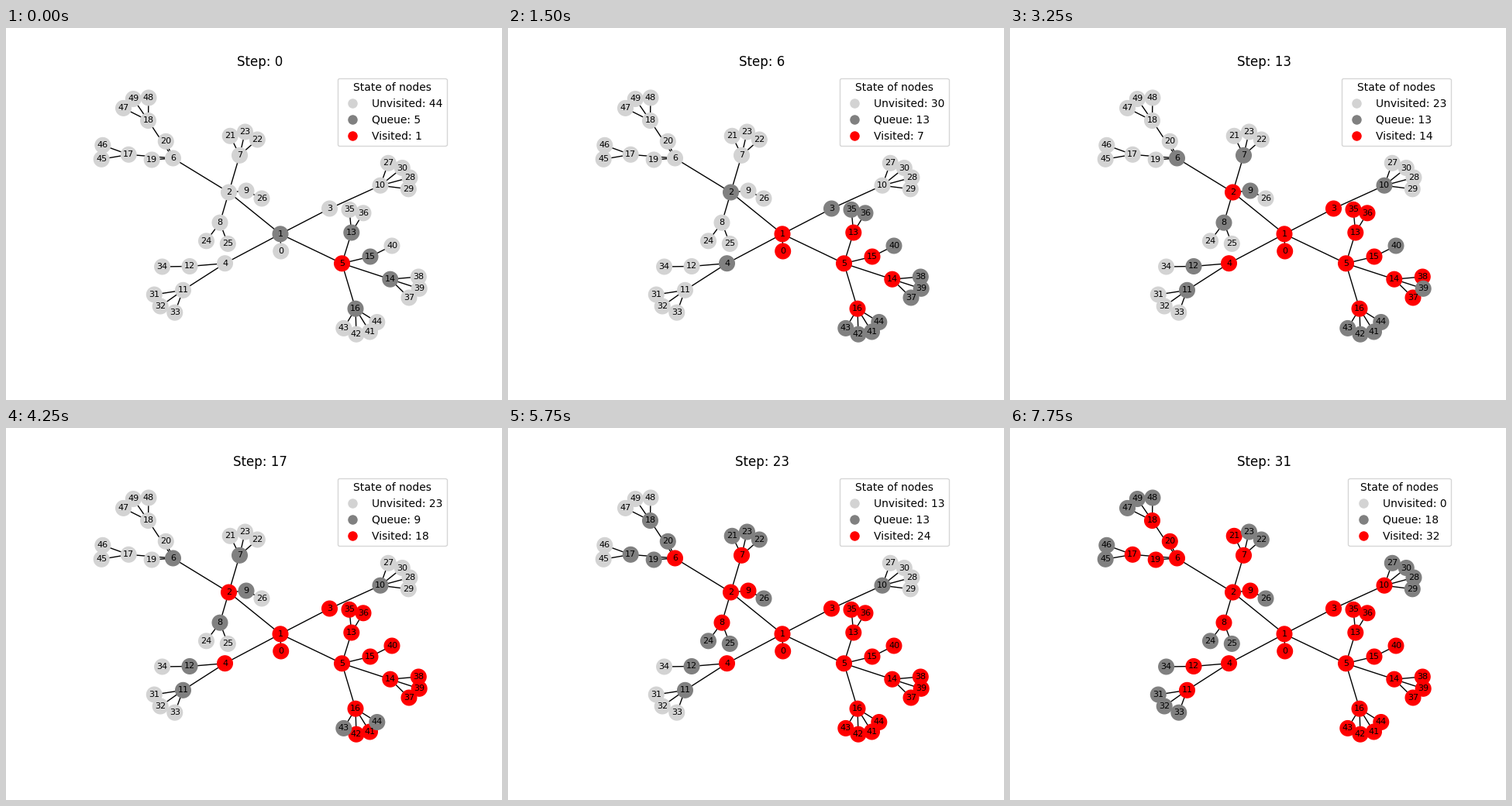
A matplotlib script that plays this animation: 640 by 480 pixels, repeating every 8 s.

```python
import matplotlib.pyplot as plt
from matplotlib.animation import FuncAnimation
from matplotlib.collections import LineCollection
from matplotlib.lines import Line2D

STEPS = 32
START = 5
COLORS = {"Unvisited": "lightgray", "Queue": "gray", "Visited": "red"}

# Node centres in stage pixels, y pointing down
POS = [
    (354.7, 288), (354, 265.8), (287.5, 212), (417.5, 233), (282.5, 303.7),
    (433.5, 303.8), (215.5, 168), (301.5, 164.3), (276, 251.2), (310, 210),
    (483, 203.2), (228.5, 338.3), (237, 307.5), (445.8, 264), (495.8, 324.2),
    (470, 295), (451, 362.2), (158.2, 163.3), (183.5, 119.5), (188.2, 170),
    (206.3, 146.3), (289.2, 139.3), (324.3, 144), (308.5, 134), (258.5, 274.8),
    (286.3, 278.4), (330, 220), (493.3, 174.3), (521, 193), (519.3, 207.8),
    (511.3, 180.5), (191.3, 344), (199.2, 359), (217.8, 367.2), (201.6, 308),
    (443, 234.3), (461, 238.8), (520, 348), (532.3, 321), (533.2, 336.3),
    (498, 281), (469.5, 392), (452, 395.2), (435.8, 387.4), (478.8, 379.5),
    (123.2, 169.3), (124.8, 151.3), (151.5, 103.4), (184, 90), (164.3, 91.5),
]
# Children per node; nodes are numbered level by level
CHILDREN = [1, 4, 4, 1, 2, 4, 4, 3, 2, 1, 4, 3, 1, 2, 3, 1, 4, 2, 3]


def build_edges():
    parents = [p for p, count in enumerate(CHILDREN) for _ in range(count)]
    return [(p, child) for child, p in enumerate(parents, 1)]


def search(edges):
    """Breadth-first search: visiting order and neighbours of each node."""
    links = {n: [] for n in range(len(POS))}
    for a, b in edges:
        links[a].append(b)
        links[b].append(a)
    order = [START]
    for node in order:
        order += [n for n in links[node] if n not in order]
    return order, links


def node_states(step):
    visited = set(order[:step + 1])
    seen = visited.union(*(links[n] for n in visited))
    return ["Visited" if n in visited else "Queue" if n in seen else "Unvisited"
            for n in range(len(POS))]


def draw(step):
    states = node_states(step)
    nodes.set_color([COLORS[s] for s in states])
    ax.set_title(f"Step: {step}")
    handles = [
        Line2D([0], [0], marker="o", color="w", markerfacecolor=color,
               markersize=10, label=f"{name}: {states.count(name)}")
        for name, color in COLORS.items()
    ]
    ax.legend(handles=handles, title="State of nodes", loc="upper right")
    return []


edges = build_edges()
order, links = search(edges)

fig, ax = plt.subplots(figsize=(6.4, 4.8), dpi=100)
ax.add_collection(LineCollection([(POS[a], POS[b]) for a, b in edges],
                                 colors="black", linewidths=1, zorder=1))
nodes = ax.scatter(*zip(*POS), s=200, c=["lightgray"] * len(POS), zorder=2)
for n, (x, y) in enumerate(POS):
    ax.text(x, y, str(n), size=8, ha="center", va="center")

# Axes units equal stage pixels
ax.set_xlim(80, 576)
ax.set_ylim(427.2, 57.6)
ax.axis("off")

anim = FuncAnimation(fig, draw, frames=STEPS, interval=250, repeat=True,
                     repeat_delay=0)
plt.show()
```
